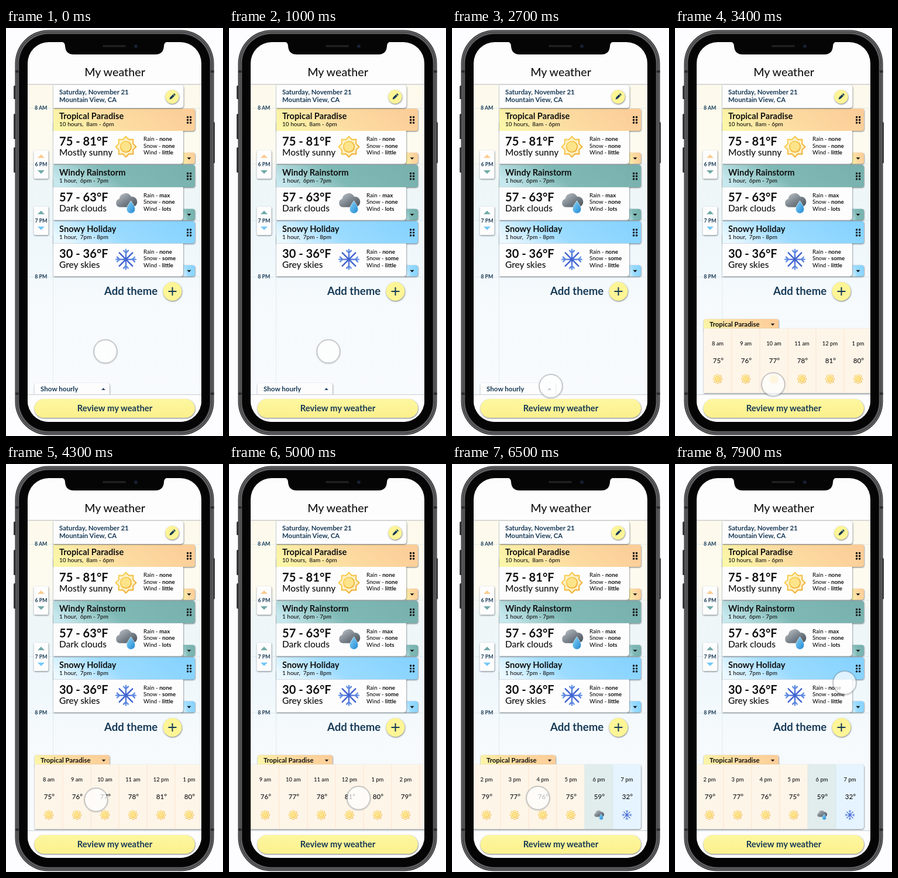
Recreate the animation shown at these times as an HTML page. Size 371 px wide and 694 px high, loop 8000 ms.

```html
<!DOCTYPE html>
<html lang="en">
<head>
<meta charset="utf-8">
<title>My weather</title>
<style>
  html, body { margin: 0; width: 100%; height: 100%; overflow: hidden; background: #fdfcfe; }
  svg { display: block; width: 371px; height: 694px; font-family: Lato, "Open Sans", sans-serif; }
  .b { font-weight: 700; }
  .m { font-weight: 500; }
</style>
</head>
<body>
<svg id="stage" viewBox="0 0 371 694"></svg>
<script>
const NAVY = '#173a56', INK = '#111', PAPER = '#fefdfe';
const LOOP = 8000;

const text = (x, y, size, str, cls = 'm', fill = INK, anchor = 'start') =>
  `<text x="${x}" y="${y}" font-size="${size}" class="${cls}" fill="${fill}" text-anchor="${anchor}" xml:space="preserve">${str}</text>`;
const rect = (x, y, w, h, fill, more = '') =>
  `<rect x="${x}" y="${y}" width="${w}" height="${h}" fill="${fill}" ${more}/>`;
const gradient = (id, dir, stops) =>
  `<linearGradient id="${id}" ${dir}>${stops.map(([o, c]) => `<stop offset="${o}" stop-color="${c}"/>`).join('')}</linearGradient>`;
// Arrow head centred on x, y; dir -1 points up, 1 down
const arrow = (x, y, w, h, dir, fill) =>
  `<path d="M${x - w / 2} ${y - dir * h / 2}h${w}L${x} ${y + dir * h / 2}Z" fill="${fill}"/>`;
// Box with rounded right corners only
const rightBox = (x, y, w, h, r, fill, more = '') =>
  `<path d="M${x} ${y}h${w - r}q${r} 0 ${r} ${r}v${h - 2 * r}q0 ${r} ${-r} ${r}h${r - w}Z" fill="${fill}" ${more}/>`;
// Box with rounded top corners only
const topBox = (x, y, w, h, r, fill, more = '') =>
  `<path d="M${x} ${y + h}v${r - h}q0 ${-r} ${r} ${-r}h${w - 2 * r}q${r} 0 ${r} ${r}v${h - r}Z" fill="${fill}" ${more}/>`;
const SHADOW = 'filter="url(#shadow)"';
const SLANT = 'x1="0" y1="0.6" x2="1" y2="0.4"';
const FALL = 'x1="0" y1="0" x2="1" y2="1"';

const defs = `<defs>
  <filter id="shadow" x="-30%" y="-40%" width="160%" height="180%" color-interpolation-filters="sRGB">
    <feDropShadow dx="0.4" dy="1" stdDeviation="1.3" flood-color="#1c2630" flood-opacity=".62"/>
  </filter>
  <clipPath id="screen"><rect x="37" y="24" width="297" height="646" rx="36"/></clipPath>
  <clipPath id="above"><rect x="37" y="96" width="297" height="528"/></clipPath>
  ${gradient('sunny', SLANT, [[0, '#fbf6a8'], [.45, '#fcdca1'], [1, '#fccd98']])}
  ${gradient('windy', SLANT, [[0, '#c6e8ee'], [.42, '#7fb9b5'], [1, '#78b1ae']])}
  ${gradient('snowy', SLANT, [[0, '#eaf8ff'], [.42, '#9bdbff'], [1, '#86d3ff']])}
  ${gradient('sky', 'x1="0" y1="0" x2="0" y2="1"', [[0, '#fdfaec'], [.22, '#fdfaf0'], [.3, '#eff6f6'], [.48, '#eef7fb'], [.7, '#f6fafd'], [1, '#f8fbfe']])}
  ${gradient('gold', FALL, [[0, '#fbd75a'], [1, '#eda52c']])}
  ${gradient('cloud', FALL, [[0, '#c3c8cd'], [.5, '#7d868e'], [1, '#454e56']])}
  ${gradient('drop', FALL, [[0, '#8ad6f9'], [1, '#1f86d0']])}
  ${gradient('ice', 'gradientUnits="userSpaceOnUse" x1="-13" y1="-13" x2="13" y2="13"', [[0, '#7fb0f0'], [.5, '#3f62d0'], [1, '#1b2f92']])}
  ${gradient('button', 'x1="0" y1="0" x2="0" y2="1"', [[0, '#fdf7a0'], [1, '#fcf08c']])}
</defs>`;

const icons = {
  sunny() {
    const pts = Array.from({ length: 16 }, (_, i) => {
      const a = i * Math.PI / 8, r = i % 2 ? 13.2 : 17.5;
      return `${(r * Math.sin(a)).toFixed(1)},${(-r * Math.cos(a)).toFixed(1)}`;
    }).join(' ');
    return `<polygon points="${pts}" fill="#fdf0c4" stroke="url(#gold)" stroke-width="2" stroke-linejoin="round"/>
      <circle r="9.2" fill="#fde48a" stroke="url(#gold)" stroke-width="1.8"/>`;
  },
  windy: () => `<path d="M-11 7a7.2 7.2 0 0 1 -.5 -14a11 11 0 0 1 20.5 -4a8.8 8.8 0 0 1 2.5 18Z" fill="url(#cloud)"/>
    <path d="M8.5 -4c3 5 7.3 10 7.3 14.3a7.3 7.3 0 0 1 -14.6 0c0 -4.3 4.3 -9.3 7.3 -14.3Z" fill="url(#drop)" stroke="#fff" stroke-width=".6"/>`,
  snowy() {
    const arms = [0, 90, 180, 270].map(a =>
      `<path transform="rotate(${a})" d="M0 0V-17M-4 -15L0 -11L4 -15M0 0L11.3 -11.3"/>`).join('');
    return `<g fill="none" stroke="url(#ice)" stroke-width="2.4" stroke-linecap="round">${arms}</g>`;
  }
};
const icon = (kind, x, y, scale = 1) =>
  `<g transform="translate(${x} ${y}) scale(${scale})">${icons[kind]()}</g>`;

const themes = [
  ['sunny', 'Tropical Paradise', '10 hours,  8am - 6pm', '75 - 81°F', 'Mostly sunny', ['none', 'none', 'little']],
  ['windy', 'Windy Rainstorm', '1 hour,  6pm - 7pm', '57 - 63°F', 'Dark clouds', ['max', 'none', 'lots']],
  ['snowy', 'Snowy Holiday', '1 hour,  7pm - 8pm', '30 - 36°F', 'Grey skies', ['none', 'some', 'little']]
];

function card([kind, name, span, temps, sky, levels], i) {
  const dots = [0, 1, 2, 3, 4, 5].map(k =>
    rect(309 + (k % 2) * 5, 150 + (k >> 1) * 4.8, 3.2, 3.2, INK, 'rx="1"')).join('');
  const facts = ['Rain', 'Snow', 'Wind'].map((w, k) =>
    text(235, 192 + k * 11.7, 9.7, `${w} - <tspan class="b">${levels[k]}</tspan>`)).join('');
  return `<g transform="translate(0 ${i * 95.8})">
    ${rightBox(300, 212, 23, 19, 4, `url(#${kind})`, SHADOW)}
    ${arrow(313, 222, 7, 3.6, 1, INK)}
    ${rightBox(81, 160, 222, 71, 5, PAPER, SHADOW)}
    ${rightBox(81, 137, 242, 38, 4, `url(#${kind})`, SHADOW)}
    ${rect(81, 175, 222, 8, PAPER)}
    ${text(91, 155, 14.7, name, 'b')}
    ${text(91, 167, 10, span)}
    ${dots}
    ${text(91, 199.5, 20.1, temps, 'b')}
    ${text(91, 216.5, 15.5, sky)}
    ${icon(kind, 205, 202)}
    ${facts}
  </g>`;
}

const stepper = (y, up, down, label) =>
  rect(47.5, y, 25, 48.5, PAPER, 'rx="2.5" ' + SHADOW) +
  arrow(60, y + 10, 12, 6, -1, up) + arrow(60, y + 37, 12, 6, 1, down) +
  text(60, y + 27, 8.8, label, 'b', NAVY, 'middle');

const hours = [75, 76, 77, 78, 81, 80, 79, 77, 76, 75, 59, 32];
function hourColumn(temp, i) {
  const x = i * 48, mid = x + 24, h = i + 8;
  const kind = i < 10 ? 'sunny' : i < 11 ? 'windy' : 'snowy';
  const label = `${h > 12 ? h - 12 : h} ${h < 12 ? 'am' : 'pm'}`;
  return (i ? rect(x - .4, 512, .8, 109, i < 10 ? '#fae0c4' : '#d5e5e8') : '') +
    text(mid, 540, 9.4, label, 'm', INK, 'middle') +
    text(mid + 1, 570, 11.6, temp + '°', 'm', INK, 'middle') +
    icon(kind, mid, 597, .47);
}

const hourly = `<g id="strip">
  ${rightBox(0, 511, 576, 110, 5, '#fef5e9', 'filter="url(#shadow)"')}
  ${rect(480, 511, 48, 110, '#e0edec')}
  ${rightBox(528, 511, 48, 110, 5, '#e6f4ff')}
  ${hours.map(hourColumn).join('')}
</g>`;

const drawer = `<g clip-path="url(#above)"><g id="drawer">
  <g id="openTab">
    ${topBox(49, 495, 128, 19, 4, 'url(#sunny)', SHADOW)}
    ${hourly}
    ${text(59, 508, 11.4, 'Tropical Paradise', 'b')}
    ${arrow(167, 504.5, 6.5, 3.4, 1, INK)}
  </g>
  <g id="closedTab">
    ${topBox(48.5, 495, 128.5, 24, 4, PAPER, SHADOW)}
    ${text(59, 509, 11.6, 'Show hourly', 'b', NAVY)}
    ${arrow(166.5, 505, 6.5, 3.4, -1, NAVY)}
  </g>
</g></g>`;

// Nested bands from the outer edge inwards: [inset, colour]
const bands = [[0, '#1e1e20'], [1, '#6f6f72'], [2.4, '#48484a'], [5, '#7d7d80'], [6, '#2a2a2c'], [7.2, '#050505']];
const phone = `
  ${rect(13, 98, 6, 23, '#3a3a3c', 'rx="1.5"')}
  ${rect(13, 146, 6, 43, '#3a3a3c', 'rx="1.5"')}
  ${rect(13, 203, 6, 43, '#3a3a3c', 'rx="1.5"')}
  ${rect(351, 160, 6, 70, '#3a3a3c', 'rx="1.5"')}
  ${bands.map(([d, c]) => rect(15.5 + d, 3.5 + d, 340 - 2 * d, 689 - 2 * d, c, `rx="${57 - d}"`)).join('')}
  ${[[16, 72], [350, 72], [16, 620], [350, 620]].map(([x, y]) => rect(x, y, 5.5, 4, '#2c2c2e')).join('')}`;

const screen = `<g clip-path="url(#screen)">
  ${rect(37, 24, 297, 646, PAPER)}
  ${rect(37, 96, 297, 528, 'url(#sky)')}
  ${[136, 231.5, 327, 423].map(y => rect(37, y, 297, .8, '#dde8ec')).join('')}
  ${rect(80.3, 96, .8, 528, '#dbe6ea')}
  ${rect(37, 95, 297, 1.6, '#cfd1d2')}
  ${text(186, 82, 19.7, 'My weather', 'm', '#161616', 'middle')}
  ${text(70.5, 139, 8.9, '8 AM', 'b', NAVY, 'end')}
  ${text(70.5, 426, 8.9, '8 PM', 'b', NAVY, 'end')}
  ${themes.map(card).reverse().join('')}
  ${rightBox(81, 97, 222.5, 39, 5, PAPER, SHADOW)}
  ${text(91, 113, 11.4, 'Saturday, November 21', 'b', NAVY)}
  ${text(91, 126, 11.4, 'Mountain View, CA', 'b', NAVY)}
  <circle cx="284" cy="117" r="11.7" fill="#fdf596" ${SHADOW}/>
  <path transform="translate(284 117) rotate(45)" d="M-1.8 -6.6h3.6v1.8h-3.6ZM-1.8 -4h3.6v7.2l-1.8 3l-1.8 -3Z" fill="${NAVY}"/>
  ${stepper(208, '#fbcb90', '#6fa9a6', '6 PM')}
  ${stepper(303.8, '#6fa9a6', '#74c8f7', '7 PM')}
  ${text(168, 454, 18.6, 'Add theme', 'b', NAVY)}
  <circle cx="284.5" cy="448" r="16" fill="#fdf596" ${SHADOW}/>
  <path d="M277.5 448h14M284.5 441v14" stroke="${NAVY}" stroke-width="2"/>
  ${drawer}
  ${rect(37, 624, 297, 46, PAPER)}
  ${rect(37, 623.2, 297, 1, '#c5ccd0')}
  ${rect(48.5, 631, 274.5, 32, 'url(#button)', 'rx="16" ' + SHADOW)}
  ${text(186, 652, 14.8, 'Review my weather', 'b', NAVY, 'middle')}
</g>
<path d="M94 23q7 1 7 8q1 14 15 14h139q14 0 15 -14q0 -7 7 -8Z" fill="#050505"/>
${rect(165, 29, 40, 3.6, '#202022', 'rx="1.8"')}
<circle cx="222" cy="31" r="3.6" fill="#10131f"/><circle cx="222" cy="31" r="1.5" fill="#23304f"/>`;

// The soft edge is drawn as rings so the translucent face stays bright
const pointer = `<g id="pointer">
  <circle r="20.2" cy=".6" fill="none" stroke="#28333c" stroke-opacity=".16" stroke-width="2.6"/>
  <circle r="19.5" fill="#fff" fill-opacity=".72" stroke="#7d868c" stroke-opacity=".6" stroke-width=".8"/></g>`;

const $ = id => document.getElementById(id);
$('stage').innerHTML = defs + phone + screen + pointer;

// Rows are [time, values...]; motion between rows is eased
const pointerPath = [
  [0, 170, 550], [1800, 170, 550], [2500, 169, 609], [3300, 169, 609],
  [3900, 154, 571], [4400, 154, 571], [4700, 290, 569], [4750, 290, 569],
  [5250, 154, 567], [5420, 154, 565], [5870, 290, 565], [6350, 147, 568],
  [6900, 147, 568], [7700, 290, 372]
];
const drawerPath = [[2850, 109], [3300, 0]];
const scrollPath = [[4750, 0], [5300, 136], [5870, 136], [6430, 302]];

function at(path, t) {
  const i = path.findIndex(row => row[0] > t);
  if (i === 0) return path[0].slice(1);
  if (i < 0) return path[path.length - 1].slice(1);
  const a = path[i - 1], b = path[i];
  const p = (t - a[0]) / (b[0] - a[0]), e = p * p * (3 - 2 * p);
  return a.slice(1).map((v, k) => v + (b[k + 1] - v) * e);
}

const move = (id, x, y) => $(id).setAttribute('transform', `translate(${x.toFixed(2)} ${y.toFixed(2)})`);

function draw() {
  const t = performance.now() % LOOP;
  const open = t >= drawerPath[0][0];
  move('pointer', ...at(pointerPath, t));
  move('drawer', 0, at(drawerPath, t)[0]);
  move('strip', 49 - at(scrollPath, t)[0], 0);
  $('openTab').style.display = open ? '' : 'none';
  $('closedTab').style.display = open ? 'none' : '';
  requestAnimationFrame(draw);
}
draw();
</script>
</body>
</html>
```
